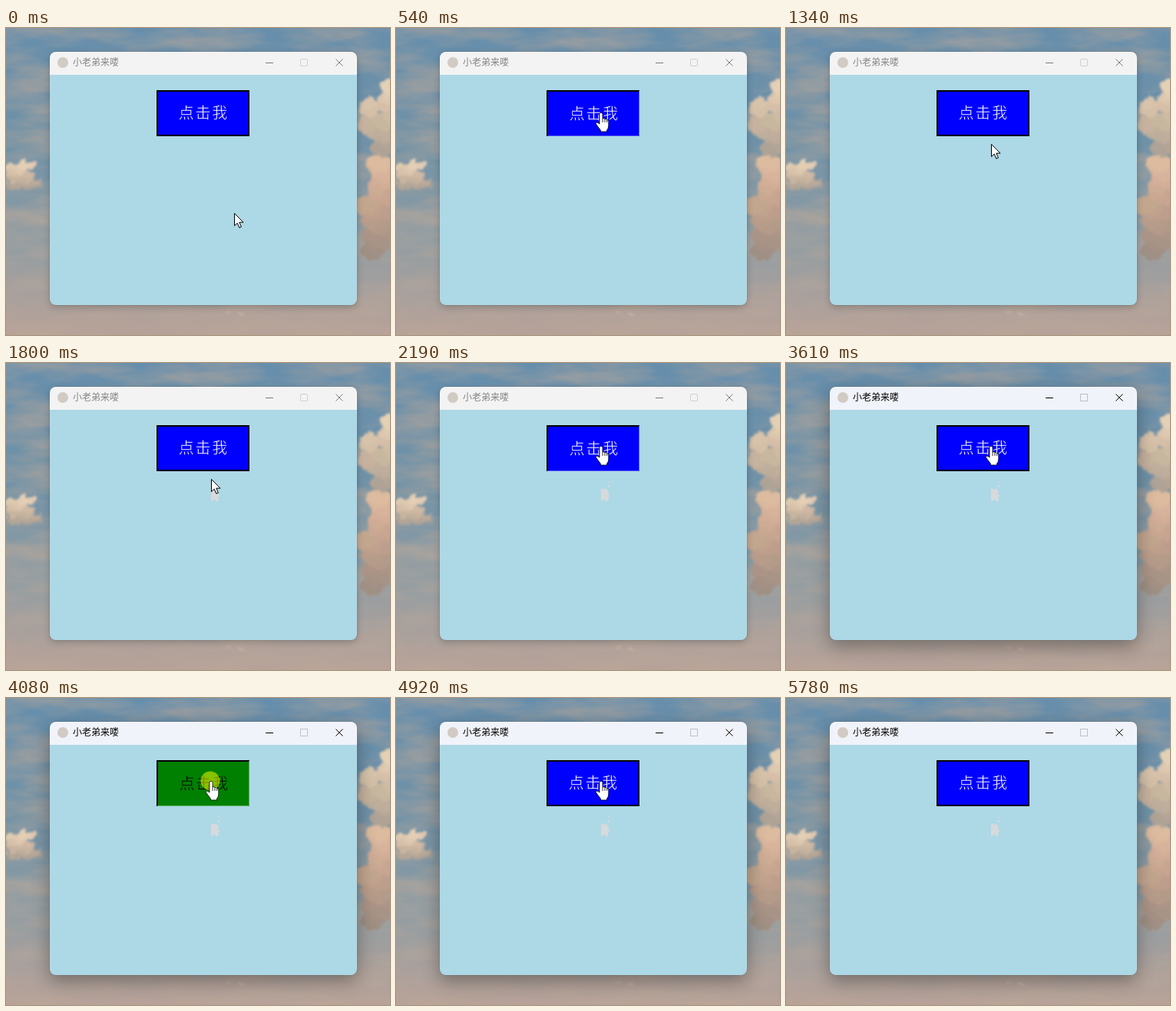
An HTML page that plays this animation: 500x400 px, repeating every 5.86 s.

```html
<!DOCTYPE html>
<html lang="zh-CN">
<head>
<meta charset="utf-8">
<style>
html, body { margin: 0; width: 100%; height: 100%; overflow: hidden; background: #718fa5; }
svg { position: absolute; left: 0; top: 0; }
text { font-family: "Noto Sans CJK SC", "Noto Sans CJK", sans-serif; }
#win { position: absolute; left: 57px; top: 31px; width: 400px; height: 330px; border-radius: 8px;
  overflow: hidden; background: linear-gradient(#0000 30px, #add8e6 30px), #f3f3f3;
  box-shadow: 0 0 0 1px #0001, 0 3px 10px #0003; }
#win.active { background-color: #f1f3fa; box-shadow: 0 0 0 1px #0001, 0 8px 24px #0005; }
</style>
</head>
<body>
<svg width="500" height="400">
  <defs>
    <linearGradient id="sky" x2="0" y2="1">
      <stop offset="0" stop-color="#668eac"/>
      <stop offset=".4" stop-color="#7092a7"/>
      <stop offset=".7" stop-color="#929da2"/>
      <stop offset="1" stop-color="#b8a298"/>
    </linearGradient>
    <filter id="haze" x="0" y="0" width="1" height="1" color-interpolation-filters="sRGB">
      <feTurbulence type="fractalNoise" baseFrequency=".008 .03" numOctaves="4" seed="7"/>
      <feColorMatrix values="0 0 0 0 .74  0 0 0 0 .66  0 0 0 0 .6  1.5 0 0 0 -.6"/>
    </filter>
    <filter id="paint" x="-20%" y="-20%" width="140%" height="140%">
      <feTurbulence type="fractalNoise" baseFrequency=".09" numOctaves="3" seed="4"/>
      <feDisplacementMap in="SourceGraphic" scale="12" xChannelSelector="R" yChannelSelector="G"/>
      <feGaussianBlur stdDeviation="1.6"/>
    </filter>
  </defs>
  <rect width="500" height="400" fill="url(#sky)"/>
  <rect width="500" height="400" filter="url(#haze)"/>
  <g id="clouds" filter="url(#paint)"></g>
</svg>
<div id="win"></div>
<svg width="500" height="400">
  <circle cx="74" cy="45" r="7" fill="#d2cbc4"/>
  <text id="title" x="87" y="49.3" font-size="12">小老弟来喽</text>
  <g fill="none">
    <path id="min" d="M338 45.5h10"/>
    <rect id="max" x="383.5" y="40.5" width="9" height="9"/>
    <path id="close" d="M429.5 40.5l9 9m0-9l-9 9"/>
  </g>
  <rect id="face" x="196" y="81" width="121" height="60"/>
  <path id="edge" fill="none" stroke="#000" stroke-width="2"/>
  <path id="shine" d="M316.5 82v58.5H197" fill="none"/>
  <text id="label" font-size="20" font-weight="300" letter-spacing="1.7" text-anchor="middle" stroke-width=".5">点击我</text>
  <path id="ghost" fill="#d6dadd" d="M267 163l4 2 2-2 4 5-1 3 3 2-3 2 1 4-3 2-2-4-2 2-3 1zM275 160l3-1v3h-2zM276 155h3v1h-3z"/>
  <circle id="halo" cx="266" cy="108" r="12.5" fill="#ff0" opacity=".52"/>
  <path id="arrow" d="M.5.5v16.2l3.7-3.5 2.6 6 2.6-1.1-2.6-5.9h5.2z" fill="#fff" stroke="#000"/>
  <g id="hand" stroke="#000" stroke-width=".8">
    <path d="M-2 5V.3a2 2 0 0 1 4 0V6q2-1 3 .8 2-.8 2.7.9 2.1-.3 2.1 2V15q0 4-2.3 6.3V23H-.5v-1.7L-6 14q-1.5-2 .2-2.8 1.8-.5 3.8 2z" fill="#fff"/>
    <path d="M2 6v5M5 7v4M7.7 8v3"/>
  </g>
</svg>
<script>
const LOOP = 5860, STEP = 80;
const $ = id => document.getElementById(id);
const set = (id, attrs) => { for (const k in attrs) $(id).setAttribute(k, attrs[k]); };
const show = (id, on) => set(id, { visibility: on ? 'visible' : 'hidden' });

let seed = 5;
const rand = () => (seed = seed * 16807 % 2147483647) / 2147483647;

// a bank of puffs, sunlit at the top and dusky at the base
function cloud(cx, cy, w, h, hue, light) {
  let puffs = '';
  for (let i = 0; i < 24; i++) {
    const v = 1 - i / 12, u = (rand() * 2 - 1) * Math.sqrt(1 - v * v * .8);
    const r = (.25 + rand() * .2) * Math.min(w, h);
    puffs += `<ellipse cx="${cx + u * w}" cy="${cy + v * h}" rx="${r * 1.4}" ry="${r}"
      fill="hsl(${hue + rand() * 8} ${30 - v * 18}% ${light - v * 9}%)"/>`;
  }
  return puffs;
}
$('clouds').innerHTML =
  cloud(490, 230, 30, 60, 20, 66) +
  cloud(494, 115, 27, 42, 28, 72) +
  cloud(18, 192, 27, 15, 28, 72) +
  cloud(298, 374, 14, 1.5, 20, 76);

// pointer moves; ex and ey bend the path and set its acceleration
const moves = [
  { start: 80, steps: 6, x: 267, y: 112 },
  { start: 710, steps: 8, x: 267, y: 151 },
  { start: 1420, steps: 2, x: 267, y: 161 },
  { start: 1730, steps: 5, x: 267, y: 110 },
  { start: 5000, steps: 7, x: 362, y: 313, ex: 2.1, ey: 1.5 },
  { start: 5550, steps: 2, x: 398, y: 390 }
];

function pointer(t) {
  let px = 297, py = 241;
  for (const { start, steps, x, y, ex = 1, ey = 1 } of moves) {
    if (t < start) break;
    const p = Math.min(1, (Math.floor((t - start) / STEP) + 1) / steps);
    px += (x - px) * p ** ex;
    py += (y - py) * p ** ey;
  }
  return [px, py];
}

function draw(t) {
  const [x, y] = pointer(t);
  const over = x > 196 && x < 317 && y > 81 && y < 141;
  const active = t >= 2340;
  const pressed = active && t < 2590 || t >= 3690 && t < 4170;
  const sunken = pressed || over && !active;
  const ink = active ? '#000' : '#7b7b7b';
  const face = pressed ? '#008000' : '#00f';

  $('win').className = active ? 'active' : '';
  set('title', { fill: active ? '#000' : '#858585' });
  set('min', { stroke: ink });
  set('close', { stroke: ink });
  set('max', { stroke: active ? '#bfc1c6' : '#d0d0d0', rx: active ? 0 : 1.5 });

  set('face', { fill: face });
  set('edge', { d: sunken ? 'M197 141V82H317' : 'M197 82H316V140H197z' });
  set('shine', { stroke: pressed ? '#58b258' : '#5858f0' });
  show('shine', sunken);
  // a stroke in the face colour thins the glyphs
  set('label', { x: sunken ? 258.3 : 257.3, y: sunken ? 119 : 118, fill: pressed ? '#000' : '#fff', stroke: face });

  show('ghost', t >= 1730);
  show('halo', pressed);
  show('arrow', !over && t < 5710);
  show('hand', over);
  const at = { transform: `translate(${Math.round(x)} ${Math.round(y)})` };
  set('arrow', at);
  set('hand', at);
}

const began = performance.now();
function tick() {
  draw((performance.now() - began) % LOOP);
  requestAnimationFrame(tick);
}
tick();
</script>
</body>
</html>
```
